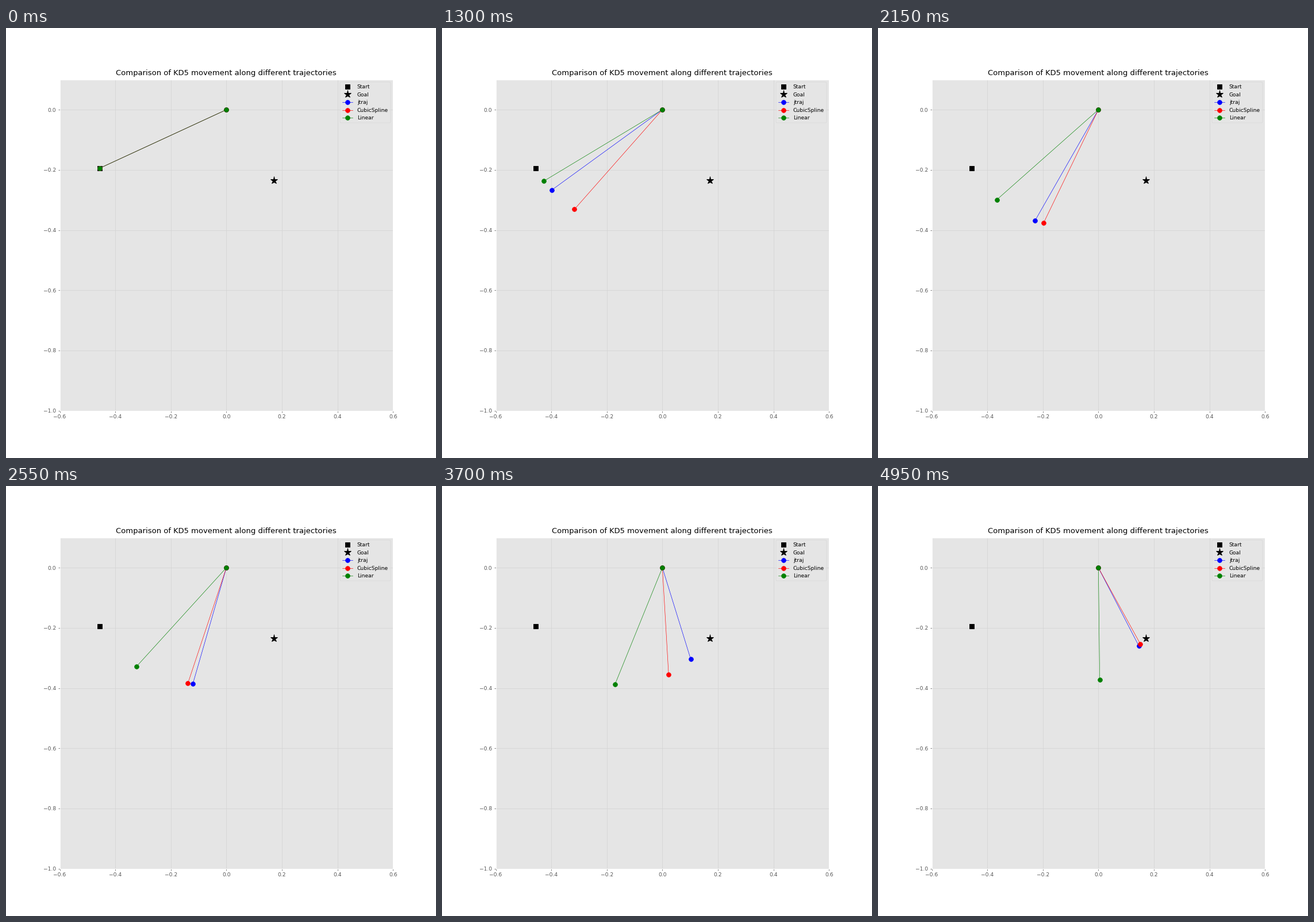
A matplotlib script for the animation above (7 s loop, 748 px wide and 748 px high).

```python
import matplotlib.pyplot as plt
import numpy as np
from matplotlib.animation import FuncAnimation

SIZE, DPI = 748, 66
STEP_MS, MOVING, TOTAL = 50, 99, 140
GOAL = (0.1705, -0.2345)

plt.rcParams.update({
    "font.family": "DejaVu Sans",
    "font.size": 10,
    "axes.facecolor": "#E5E5E5",
    "axes.edgecolor": "white",
    "axes.linewidth": 1,
    "axes.axisbelow": True,
    "xtick.color": "#555555",
    "ytick.color": "#555555",
    "patch.linewidth": 0.5,
})


def tip(shoulder, elbow):
    """Tool position for the given progress of the two joints."""
    angle = np.radians(23.08 + 91 * shoulder + 5.2 * shoulder**2)
    reach = np.sqrt(0.1674 - 0.1156 * np.sin(1.5 * (elbow - 0.5)))
    return -reach * np.cos(angle), -reach * np.sin(angle)


def quintic(i):
    t = i / MOVING
    return t**3 * (10 - 15 * t + 6 * t**2)


def speed_up(t):
    return t * (0.935 + 0.08 * t)


def steady(i):
    return speed_up(i / MOVING)


def smooth(i):
    t = max(i - 2, 0) / 149
    return speed_up(t**2 * (3 - 2 * t))


fig = plt.figure(figsize=(SIZE / DPI, SIZE / DPI), dpi=DPI, facecolor="white")
ax = fig.add_axes([0.125, 0.11, 0.775, 0.77])
ax.set_xlim(-0.6, 0.6)
ax.set_ylim(-1.0, 0.1)
ax.set_xticks(np.linspace(-0.6, 0.6, 7))
ax.set_yticks(np.linspace(-1.0, 0.0, 6))
ax.xaxis.set_major_formatter("{x:.1f}")
ax.yaxis.set_major_formatter("{x:.1f}")
ax.grid(color="lightgrey", linewidth=0.8)
ax.set_title("Comparison of KD5 movement along different trajectories",
             fontsize=14.27, pad=8.2)

ax.plot(*tip(0, 0), "s", color="black", markersize=8, label="Start")
ax.plot(*GOAL, "*", color="black", markersize=14.5, label="Goal")


def add_arm(label, color, ease, elbow_ratio=1):
    line, = ax.plot([], [], "-o", color=color, linewidth=0.7, markersize=8.3, label=label)
    return line, ease, elbow_ratio


arms = [
    add_arm("jtraj", "blue", quintic),
    add_arm("CubicSpline", "red", steady),
    add_arm("Linear", "green", smooth, elbow_ratio=0.94),
]
ax.legend(loc="upper right", facecolor="#E5E5E5", edgecolor="0.8")


def update(frame):
    i = min(frame, MOVING)
    for line, ease, elbow_ratio in arms:
        progress = ease(i)
        x, y = tip(progress, progress * elbow_ratio)
        line.set_data([0, x], [0, y])
    return [arm[0] for arm in arms]


anim = FuncAnimation(fig, update, frames=TOTAL, interval=STEP_MS,
                     init_func=lambda: update(0), repeat=True, repeat_delay=0)
plt.show()
```
